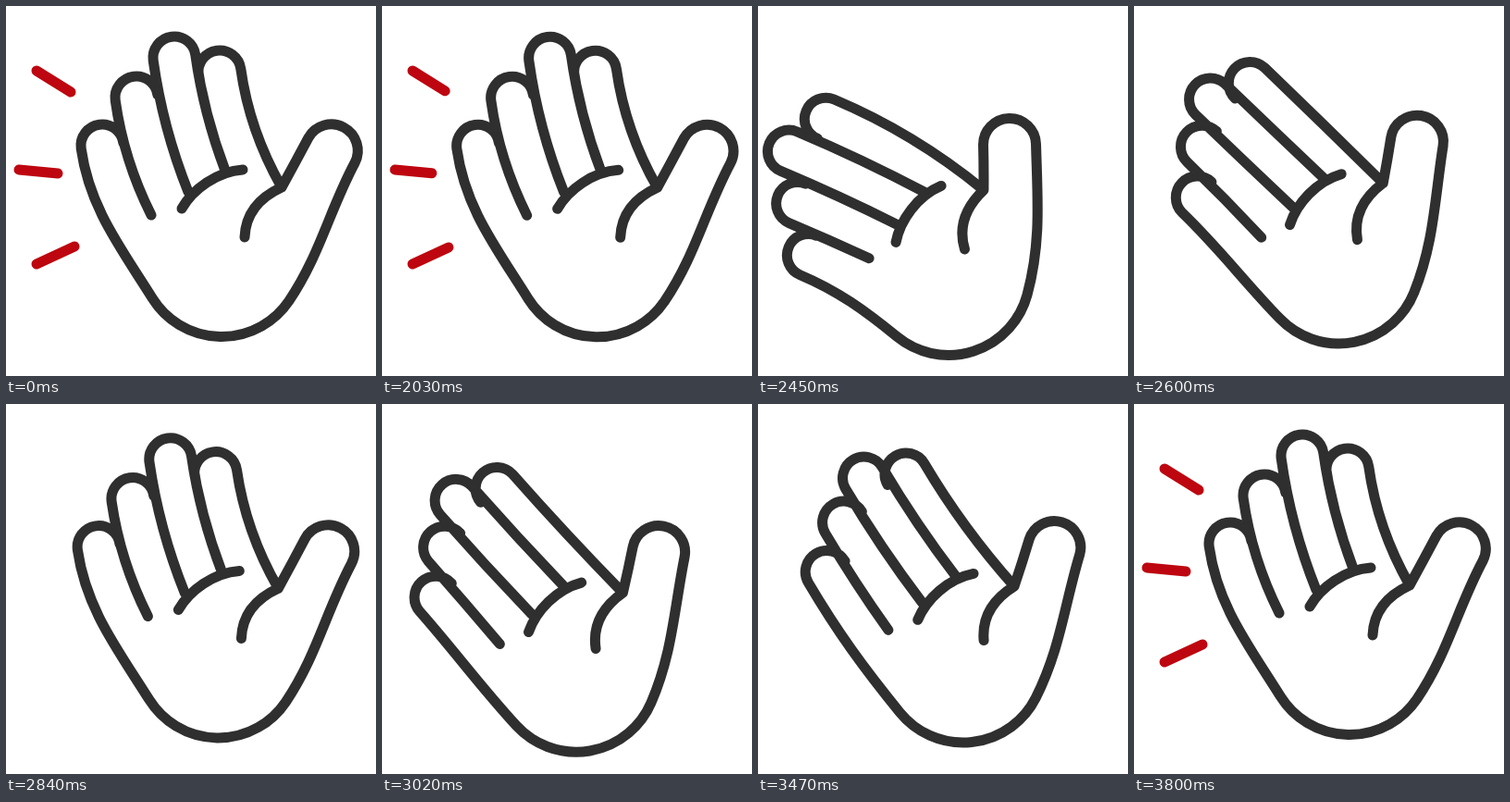
Write an HTML page that moves like this. It is 400 by 400 pixels and loops after 3.83 s.

```html
<!DOCTYPE html>
<html lang="en">
<head>
<meta charset="utf-8">
<title>Waving hand</title>
<style>
html, body { margin: 0; width: 100%; height: 100%; overflow: hidden; background: #fff; }
svg { display: block; width: 100vw; height: 100vh; }
path { fill: none; stroke-width: 11; stroke-linecap: round; stroke-linejoin: round; }
#hand { stroke: #2f2f2f; }
#rays { stroke: #bd0610; }
</style>
</head>
<body>
<svg viewBox="0 0 400 400"><path id="rays"/><path id="hand"/></svg>
<script>
const LOOP = 3830, HOLD = 2030, STEP = 30;
const FINGER_R = 23, THUMB_R = 28.5, HEEL_R = 88;

// Fingertip centres: upright, bent.
const TIPS = {
  little: [[104, 151], [74, 247]],
  ring: [[141, 99], [63, 191]],
  middle: [[182, 56], [55, 135]],
  index: [[231, 71], [95, 101]],
  thumb: [[352, 156], [293, 131]]
};
const HEEL = [[233, 269.5], [226, 270]];
const ARC = [-10, -16];    // how far fingertips swing out halfway
const REACH = [-22, 21.5]; // how far the whole hand sways

// Outer end, inner end.
const RAYS = [[[33, 70], [70, 93]], [[14, 177], [56, 181]], [[33, 279], [74, 260]]];

// [step, value] keys
const BEND = [[2.5, 0], [15.2, 1.02], [27, 0], [27.5, 0], [39.5, 1.02], [56, 0]];
const SWAY = [[0, 0], [12.5, 1], [24.8, 0], [37, 1], [58, 0]];

const clamp = x => Math.min(1, Math.max(0, x));
const lerp = (a, b, k) => a + (b - a) * k;
const sine = x => (1 - Math.cos(Math.PI * x)) / 2;
const soft = x => 0.6 * sine(x) + 0.4 * x;
const rad = deg => deg * Math.PI / 180;

const mix = (p, q, k) => [lerp(p[0], q[0], k), lerp(p[1], q[1], k)];
const add = (p, v, k = 1) => [p[0] + v[0] * k, p[1] + v[1] * k];
const dist = (p, q) => Math.hypot(p[0] - q[0], p[1] - q[1]);
const ray = deg => [Math.cos(rad(deg)), Math.sin(rad(deg))];
const xy = p => p.map(v => v.toFixed(2)).join();

const move = p => "M" + xy(p);
const line = p => "L" + xy(p);
const quad = (c, p) => `Q${xy(c)} ${xy(p)}`;
const cubic = (a, b, p) => `C${xy(a)} ${xy(b)} ${xy(p)}`;
const arc = (r, p) => `A${r} ${r} 0 0 1 ${xy(p)}`;

function keyed(keys, s) {
  if (s <= keys[0][0]) return keys[0][1];
  for (let i = 1; i < keys.length; i++) {
    const [s0, v0] = keys[i - 1], [s1, v1] = keys[i];
    if (s <= s1) return lerp(v0, v1, sine((s - s0) / (s1 - s0)));
  }
  return keys[keys.length - 1][1];
}

// Round tip: its two sides and the direction it points to (0 degrees is up).
function cap([rest, bent], m, deg, r, swing) {
  const c = add(mix(rest, bent, m), ARC, swing * 4 * m * (1 - m));
  const side = ray(deg);
  return { left: add(c, side, -r), right: add(c, side, r), dir: ray(deg - 90) };
}

// Control point of a finger edge that is tangent to the tip.
const edge = (base, side, dir) => add(side, dir, -dist(base, side) / 2);

// Smooth link between two points, leaving along u and arriving along v.
function link(p, u, q, v) {
  const k = 0.36 * dist(p, q);
  return cubic(add(p, u, k), add(q, v, -k), q);
}

function handPath(m) {
  const heel = mix(...HEEL, m);
  const turn = -18.4 * m;

  // The palm turns rigidly about its heel.
  const palm = (x, y) => {
    const dx = x - HEEL[0][0], dy = y - HEEL[0][1];
    return add(add(heel, ray(turn), dx), ray(turn + 90), dy);
  };
  const finger = name => cap(TIPS[name], m, lerp(-8, -66, m), FINGER_R, 1);
  const thumb = cap(TIPS.thumb, m, lerp(28, -1, m), THUMB_R, 0);
  const little = finger("little"), ring = finger("ring");
  const middle = finger("middle"), index = finger("index");

  const knuckles = [palm(157, 226), palm(197, 201), palm(237, 178)];
  const notch = palm(298, 196);
  const a = 34 + turn, b = 148 + turn;
  const heelRight = add(heel, ray(a), HEEL_R);
  const heelLeft = add(heel, ray(b), HEEL_R);
  const back = dir => [-dir[0], -dir[1]];

  const upLeft = (base, f) =>
    move(base) + quad(edge(base, f.left, f.dir), f.left) + arc(FINGER_R, f.right);
  const downRight = (f, base) => quad(edge(base, f.right, f.dir), base);

  return [
    move(notch), quad(edge(notch, thumb.left, thumb.dir), thumb.left),
    arc(THUMB_R, thumb.right),
    link(thumb.right, back(thumb.dir), heelRight, ray(a + 90)),
    arc(HEEL_R, heelLeft),
    link(heelLeft, ray(b + 90), little.left, little.dir),
    arc(FINGER_R, little.right),
    upLeft(knuckles[0], ring),
    upLeft(knuckles[1], middle), downRight(middle, knuckles[2]),
    move(index.left), arc(FINGER_R, index.right), downRight(index, notch),
    move(palm(190, 219)), cubic(palm(202, 198), palm(228, 179), palm(256, 177)),
    move(notch), cubic(palm(274, 207), palm(259, 225), palm(258, 250))
  ].join("");
}

function raysPath(s) {
  const shrink = soft(clamp(s / 10.7));
  const grow = soft(clamp((s - 49.5) / 10.5));
  const [from, to] = grow > 0 ? [1 - grow, 1] : [0, 1 - shrink];
  if (to <= from) return "";
  return RAYS.map(([p, q]) => move(mix(p, q, from)) + line(mix(p, q, to))).join("");
}

const hand = document.getElementById("hand");
const rays = document.getElementById("rays");

function frame() {
  const t = performance.now() % LOOP;
  const s = t < HOLD ? 0 : Math.floor((t - HOLD) / STEP) + 1;
  const sway = keyed(SWAY, s);
  hand.setAttribute("d", handPath(keyed(BEND, s)));
  hand.setAttribute("transform", `translate(${REACH.map(v => v * sway)})`);
  rays.setAttribute("d", raysPath(s));
  requestAnimationFrame(frame);
}
frame();
</script>
</body>
</html>
```
